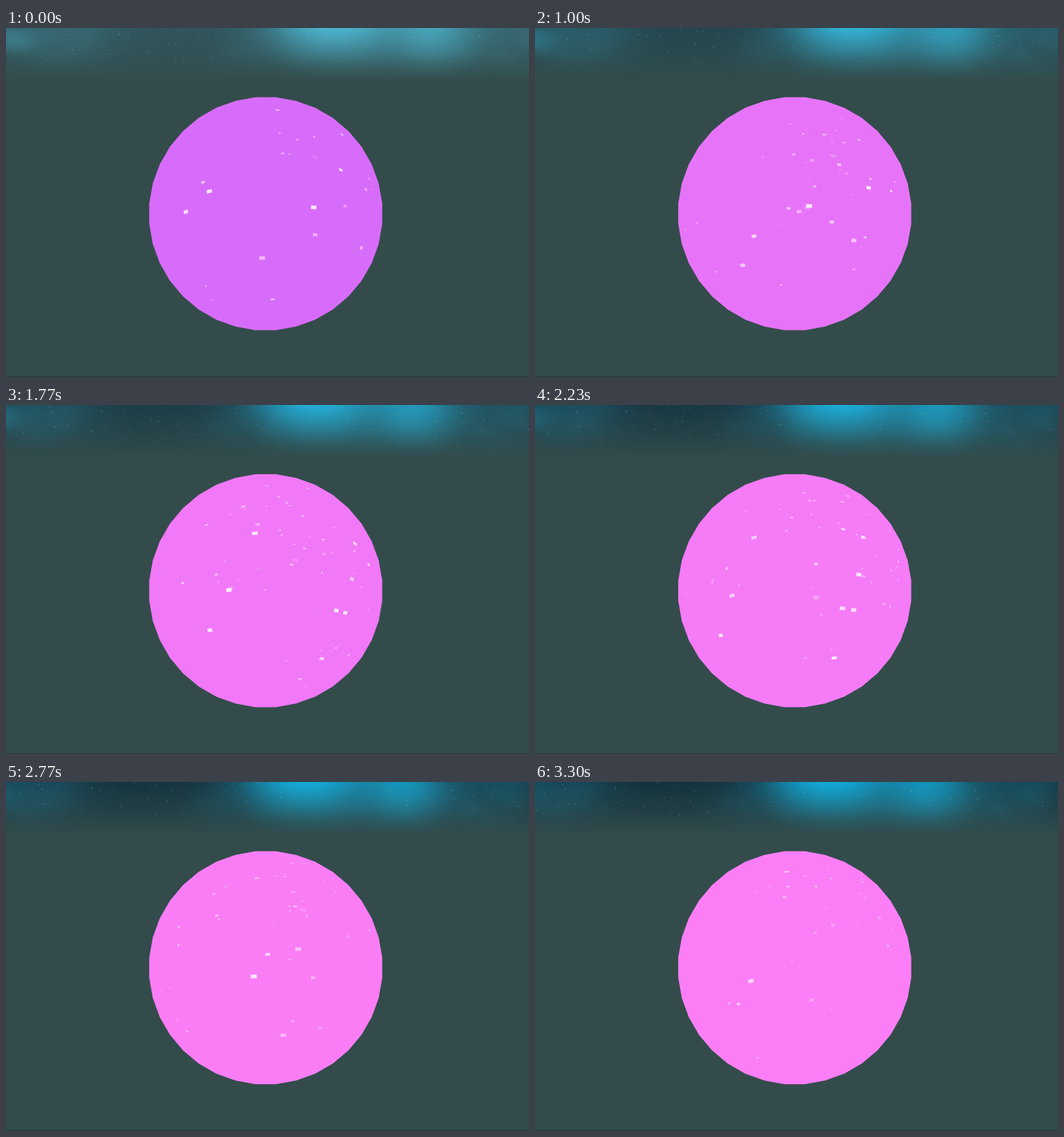
Recreate the animation shown at these times as an HTML page with a canvas. Size 746 by 498 pixels, loop 3.38 s.

```html
<!DOCTYPE html>
<html lang="en">
<head>
<meta charset="utf-8">
<title>Glinting planet</title>
<style>
html, body { margin: 0; width: 100%; height: 100%; overflow: hidden; background: rgb(51,76,75); }
canvas { display: block; }
</style>
</head>
<body>
<canvas id="stage" width="746" height="498"></canvas>
<script>
const ctx = document.getElementById('stage').getContext('2d');
const W = 746, H = 498, LOOP = 3380, STEPS = 44, SKY = 73, DRIFT = 47;
const CX = 370.5, CY = 265, R = 166.5;
const DIST = 4, FOCAL = Math.sqrt(DIST * DIST - 1);
const TILT = 21 * Math.PI / 180, ROLL = 4 * Math.PI / 180, SPIN = 0.035;
const BG = '51,76,75';

let seed = 7;
const rand = () => (seed = (seed * 16807) % 2147483647) / 2147483647;
const many = (n, make) => Array.from({ length: n }, make);
const mix = (a, b, k) => a.map((v, i) => Math.round(v + (b[i] - v) * k)).join();

function turn(a, b, angle) {
  const c = Math.cos(angle), s = Math.sin(angle);
  return [a * c - b * s, a * s + b * c];
}

// Latitude and longitude to the screen, seen in perspective
function project(lat, lon) {
  let x = Math.cos(lat) * Math.sin(lon), y = Math.sin(lat), z = Math.cos(lat) * Math.cos(lon);
  [z, y] = turn(z, y, TILT);
  [x, y] = turn(x, y, ROLL);
  const k = R * FOCAL / (DIST - z);
  return { x: CX + x * k, y: CY - y * k, front: z > 1 / DIST };
}

// Screen point at a given step back to the sphere surface
function unproject(px, py, step) {
  const u = (px - CX) / R / FOCAL, v = (CY - py) / R / FOCAL, k = 1 + u * u + v * v;
  const q = (DIST - Math.sqrt(Math.max(0, DIST * DIST - k * FOCAL * FOCAL))) / k;
  let x = u * q, y = v * q, z = DIST - q;
  [x, y] = turn(x, y, -ROLL);
  [z, y] = turn(z, y, -TILT);
  return { lat: Math.asin(y), lon: Math.atan2(x, z) + SPIN * step };
}

// The largest glints: step of full brightness, then x and y
const glints = [
  [0, 439, 256], [0, 290, 233], [3, 243, 268], [7, 326, 333], [7, 483, 307], [13, 391, 254],
  [13, 476, 228], [23, 318, 264], [23, 355, 183], [25, 461, 292], [25, 475, 295],
  [26, 484, 193], [26, 277, 325], [29, 427, 361], [29, 462, 242], [38, 340, 279]
].map(([step, x, y]) => ({ ...unproject(x, y, step), step, life: 11, size: 0.95, power: 0.95 }));

// Short-lived sparkles, denser toward the upper right
glints.push(...many(230, () => {
  const lit = rand() < 0.6;
  const angle = lit ? -0.9 + (rand() - 0.5) * 1.6 : rand() * 2 * Math.PI;
  const dist = R * (lit ? 0.5 + 0.47 * rand() : 0.95 * Math.sqrt(rand()));
  const step = rand() * STEPS;
  const spot = unproject(CX + dist * Math.cos(angle), CY + dist * Math.sin(angle), step);
  return { ...spot, step, life: 4, size: 0.35 + 0.45 * rand() ** 2, power: 0.35 + 0.55 * rand() };
}));

const stars = many(420, () => ({ x: rand() * (W + DRIFT), y: rand() * SKY, a: 0.08 + 0.5 * rand() ** 5 }));
const puffs = many(50, () => ({ x: rand() * (W + DRIFT), y: rand() * 60, r: 15 + 35 * rand(), a: 0.08 + 0.16 * rand() }));

function cloud(x, y, rx, ry, color, alpha) {
  ctx.save();
  ctx.translate(x, y);
  ctx.scale(rx, ry);
  const g = ctx.createRadialGradient(0, 0, 0, 0, 0, 1);
  for (let r = 0; r <= 1; r += 0.125) {
    g.addColorStop(r, `rgba(${color},${alpha * (0.5 + 0.5 * Math.cos(Math.PI * r))})`);
  }
  ctx.fillStyle = g;
  ctx.fillRect(-1, -1, 2, 2);
  ctx.restore();
}

function drawSky(p, ease) {
  const glow = mix([76, 180, 206], [16, 170, 218], ease);
  const teal = mix([62, 130, 146], [24, 108, 132], ease);
  const dark = mix([48, 84, 92], [20, 50, 61], ease);
  ctx.save();
  ctx.beginPath();
  ctx.rect(0, 0, W, SKY);
  ctx.clip();
  ctx.fillStyle = `rgb(${dark})`;
  ctx.fillRect(0, 0, W, SKY);
  ctx.translate(-DRIFT * p, 0);
  cloud(80, 22, 130, 70, teal, 0.7);
  cloud(10, 17, 50, 30, glow, 0.45);
  cloud(560, 25, 300, 130, teal, 0.95);
  for (const f of puffs) cloud(f.x, f.y, f.r * 1.4, f.r, f.x < 330 ? dark : teal, f.a);
  cloud(468, 0, 135, 95, glow, 1);
  cloud(604, 18, 85, 85, glow, 0.75);
  for (const s of stars) {
    ctx.fillStyle = `rgba(190,220,225,${s.a})`;
    ctx.fillRect(s.x, s.y, 1.3, 1.3);
  }
  ctx.translate(DRIFT * p, 0);
  const fade = ctx.createLinearGradient(0, 0, 0, SKY);
  fade.addColorStop(0, `rgba(${BG},0)`);
  fade.addColorStop(0.5, `rgba(${BG},0.38)`);
  fade.addColorStop(1, `rgba(${BG},0.93)`);
  ctx.fillStyle = fade;
  ctx.fillRect(0, 0, W, SKY);
  ctx.restore();
}

function drawGlint(g, step) {
  const age = (step - g.step) / g.life;
  if (Math.abs(age) >= 1) return;
  const lon = g.lon - SPIN * step;
  if (!project(g.lat, lon).front) return;
  const dy = 0.013 * g.size, dx = 0.021 * g.size / Math.max(0.25, Math.cos(g.lat));
  ctx.fillStyle = `rgba(255,240,255,${g.power * (1 - age * age)})`;
  ctx.beginPath();
  for (const [a, b] of [[-1, -1], [1, -1], [1, 1], [-1, 1]]) {
    const p = project(g.lat + b * dy, lon + a * dx);
    ctx.lineTo(p.x, p.y);
  }
  ctx.fill();
}

function drawPlanet(step, ease) {
  const sides = 36;
  ctx.fillStyle = `rgb(${mix([216, 108, 250], [252, 126, 246], ease)})`;
  ctx.beginPath();
  for (let i = 0; i < sides; i++) {
    const a = (i + 0.5) * 2 * Math.PI / sides;
    ctx.lineTo(CX + (R + 0.3) * Math.sin(a), CY - (R + 0.3) * Math.cos(a));
  }
  ctx.fill();
  ctx.save();
  ctx.clip();
  for (const g of glints) drawGlint(g, step);
  ctx.restore();
}

function draw(time) {
  const step = Math.floor(((time % LOOP) + 4) / (LOOP / STEPS)) % STEPS;
  const p = step / (STEPS - 1), ease = 1 - (1 - p) ** 1.5;
  ctx.fillStyle = `rgb(${BG})`;
  ctx.fillRect(0, 0, W, H);
  drawSky(p, ease);
  drawPlanet(step, ease);
  ctx.fillStyle = 'rgb(42,62,61)';
  ctx.fillRect(0, H - 1.5, W, 1.5);
}

const start = performance.now();
function tick() {
  draw(performance.now() - start);
  requestAnimationFrame(tick);
}
tick();
</script>
</body>
</html>
```
